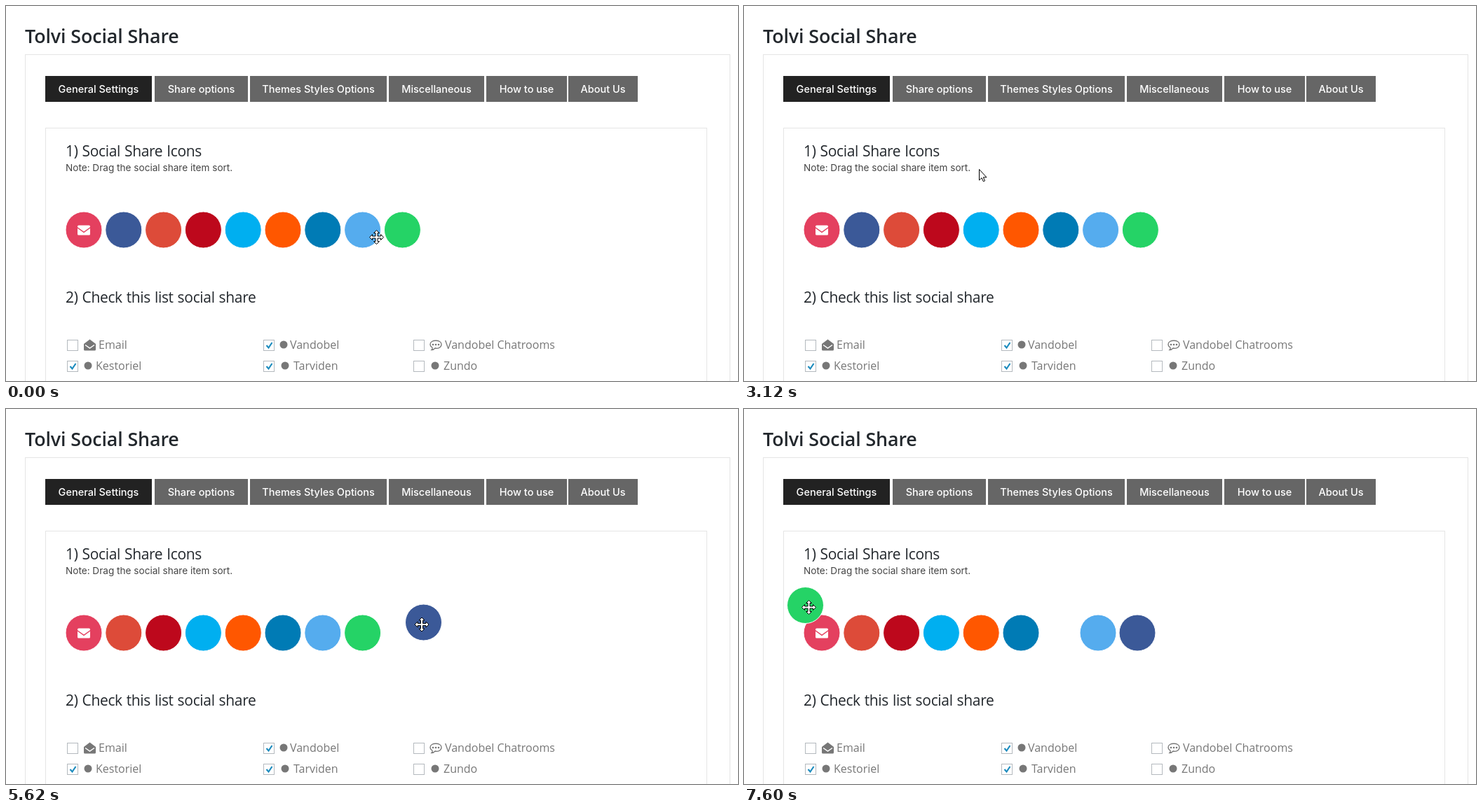
Write an HTML page that moves like this. It is 1044 by 536 pixels and loops after 8000 ms.

```html
<!DOCTYPE html>
<html lang="en">
<head>
<meta charset="utf-8">
<title>Share settings</title>
<style>
html, body { margin: 0; width: 100%; height: 100%; overflow: hidden; background: #fff; }
svg { display: block; width: 1044px; height: 536px; }
text { font-family: "Open Sans", "Noto Sans", sans-serif; white-space: pre; }
.title { font-size: 26.8px; font-weight: 600; letter-spacing: -.1px; fill: #23282d; }
.head { font-size: 21px; letter-spacing: -.33px; word-spacing: .8px; fill: #23282d; }
.label { font-size: 16px; fill: #777; }
.tab { font: 500 14.5px Inter, sans-serif; fill: #fff; text-anchor: middle; }
.note { font: 13.6px Inter, sans-serif; fill: #444; }
.frame { fill: none; stroke: #e5e5e5; }
.box { fill: #fff; stroke: #b4b9be; }
.tick { fill: none; stroke: #1e8cbe; stroke-width: 2.2; }
.disc { stroke: #fff; }
.cursor { fill: #fff; stroke: #000; stroke-linejoin: round; }
</style>
</head>
<body>
<svg id="stage" viewBox="0 0 1044 536"></svg>
<script>
const stage = document.getElementById("stage");

function add(tag, attrs, text = "") {
  const el = document.createElementNS("http://www.w3.org/2000/svg", tag);
  for (const key in attrs) el.setAttribute(key, attrs[key]);
  el.textContent = text;
  return stage.appendChild(el);
}
const write = (cls, x, y, text) => add("text", { class: cls, x, y }, text);
const path = (d, attrs) => add("path", { d, ...attrs });

// Page
write("title", 27, 53, "Tolvi Social Share");
add("rect", { class: "frame", x: 27.5, y: 69.5, width: 1005, height: 500 });
add("rect", { class: "frame", x: 56.5, y: 174.5, width: 943, height: 400 });

[["General Settings", 56, 208], ["Share options", 212, 345], ["Themes Styles Options", 348, 543],
 ["Miscellaneous", 546, 682], ["How to use", 685, 800], ["About Us", 802, 901]]
.forEach(([name, left, right], i) => {
  add("rect", { x: left, y: 100, width: right - left, height: 37, fill: i ? "#666" : "#222" });
  write("tab", (left + right) / 2, 124, name);
});

const selection = add("rect", { x: 85, y: 191, width: 193, height: 29, fill: "#3390ff" });
const heading = write("head", 85, 214.5, "1) Social Share Icons");
write("note", 85, 236, "Note: Drag the social share item sort.");
write("head", 85, 423.5, "2) Check this list social share");

// Check list: box x, row y, checked, label x, label, badge x
[[88, 478, false, 132, "Email"], [368, 478, true, 405, "Vandobel", 396],
 [582, 478, false, 626, "Vandobel Chatrooms"], [88, 508, true, 128, "Kestoriel", 117],
 [368, 508, true, 410, "Tarviden", 398], [582, 508, false, 624, "Zundo", 612]]
.forEach(([x, y, checked, labelX, label, badge]) => {
  add("rect", { class: "box", x: x - .5, y: y - .5, width: 15, height: 15 });
  if (checked) path(`M${x + 3.5} ${y + 7}l3 3.5 5-7.5`, { class: "tick" });
  write("label", labelX, y + 12, label);
  if (badge) add("circle", { cx: badge, cy: y + 6, r: 5.5, fill: "#777" });
});
path("M111 483l8.5-6.5 8.5 6.5v8q0 1.5-1.5 1.5h-14q-1.5 0-1.5-1.5z", { fill: "#777" });
path("M113 484.5l6.5 4.5 6.5-4.5", { fill: "none", stroke: "#fff", "stroke-width": 1.5 });
path("M608 488q-3-1.5-3-4.5c0-7 16-7 16 0 0 5-5 6.5-9 5.5q-2 2.5-5 2.5 1.5-1.5 1-3.5z",
  { fill: "none", stroke: "#777", "stroke-width": 1.3 });
[609, 613, 617].forEach(cx => add("circle", { cx, cy: 484, r: 1.3, fill: "#777" }));

// Discs: initial slot and colour; the two draggable ones lie on top
const MAIL = 0, BLUE = 1, SKY = 7, GREEN = 8;
const discs = [[MAIL, "#e4405f"], [2, "#dd4b39"], [3, "#bd081c"], [4, "#00aff0"], [5, "#ff5700"],
  [6, "#007bb5"], [SKY, "#55acee"], [GREEN, "#25d366"], [BLUE, "#3b5998"]]
.map(([slot, fill]) => {
  const el = add("circle", { class: "disc", r: 26, fill });
  if (slot === MAIL) {
    add("rect", { x: 102, y: 313.5, width: 18, height: 14, rx: 1.5, fill: "#fff" });
    path("M101.5 316.5l9.5 6.8 9.5-6.8", { fill: "none", stroke: fill, "stroke-width": 1.5 });
  }
  return { slot, el };
});

function place(el, x, y) {
  el.setAttribute("transform", `translate(${x} ${y})`);
}

function slotX(slot, layout) {
  if (layout && slot === BLUE) return 561;
  if (layout === 2 && slot === SKY) return 505;
  return 111 + 56.8 * (layout && slot > BLUE ? slot - 1 : slot);
}

// Cursors
const cursors = {
  arrow: path("M.5.5v15.5l3.5-3.3 2.4 5.1 2.2-1-2.3-4.9h4.7z", { class: "cursor" }),
  move: path("M0-10l4 4H1.5v4.5H6V-4l4 4-4 4V1.5H1.5V6H4l-4 4-4-4h2.5V1.5H-6V4l-4-4 4-4v2.5h4.5V-6H-4z",
    { class: "cursor" }),
  beam: path("M-3.5-7h2.5l1 1 1-1h2.5M-3.5 7.5h2.5l1-1 1 1h2.5M0-6V6.5", { fill: "none", stroke: "#000" }),
  hand: path("M5 14V2.4Q5 .6 6.5.6T8 2.4V8q2-.8 2.8.8 1.8-.7 2.4 1 2.3-.4 2.3 1.7v4q0 2-1.5 4.5v1.5H6.5V20L1 14.2q-1.2-2 .6-2.4 1.2 0 3.4 2.2z",
    { class: "cursor" })
};

// Start time, cursor, its place, and what else holds
const steps = [
  [0, "move", 528.5, 330.5],
  [500],
  [640, "arrow", 225, 187],
  [1170, "arrow", 367, 224],
  [1630, "beam", 276, 205.5],
  [2140, "beam", 88, 207.5, { selected: true }],
  [2620, "hand", 272, 225, { selected: true }],
  [3120, "arrow", 335, 233],
  [3630, "move", 201, 321.5],
  [4130, "move", 167.5, 321.5],
  [4620, "move", 265.5, 284, { drag: [BLUE, 268, 280.5] }],
  [5120, "move", 543, 283, { drag: [BLUE, 545.5, 279.5] }],
  [5620, "move", 593, 308, { layout: 1, drag: [BLUE, 595.5, 305] }],
  [6130, "move", 520, 320.5, { layout: 1 }],
  [6620, "move", 511, 321, { layout: 1 }],
  [7120, "move", 216, 277, { layout: 2, drag: [GREEN, 211, 274] }],
  [7600, "move", 92.5, 283.5, { layout: 2, drag: [GREEN, 87.5, 280.5] }]
];

const show = (el, on) => el.setAttribute("visibility", on ? "visible" : "hidden");

function draw(now) {
  const time = now % 8000;
  const [, kind, x, y, { selected = false, layout = 0, drag = [] } = {}] =
    steps.findLast(step => step[0] <= time);
  show(selection, selected);
  heading.style.fill = selected ? "#fff" : "";
  for (const { slot, el } of discs) {
    if (slot === drag[0]) place(el, drag[1], drag[2]);
    else place(el, slotX(slot, layout), 320);
  }
  for (const name in cursors) show(cursors[name], name === kind);
  if (kind) place(cursors[kind], x, y);
}

function loop() {
  draw(performance.now());
  requestAnimationFrame(loop);
}
loop();
</script>
</body>
</html>
```
